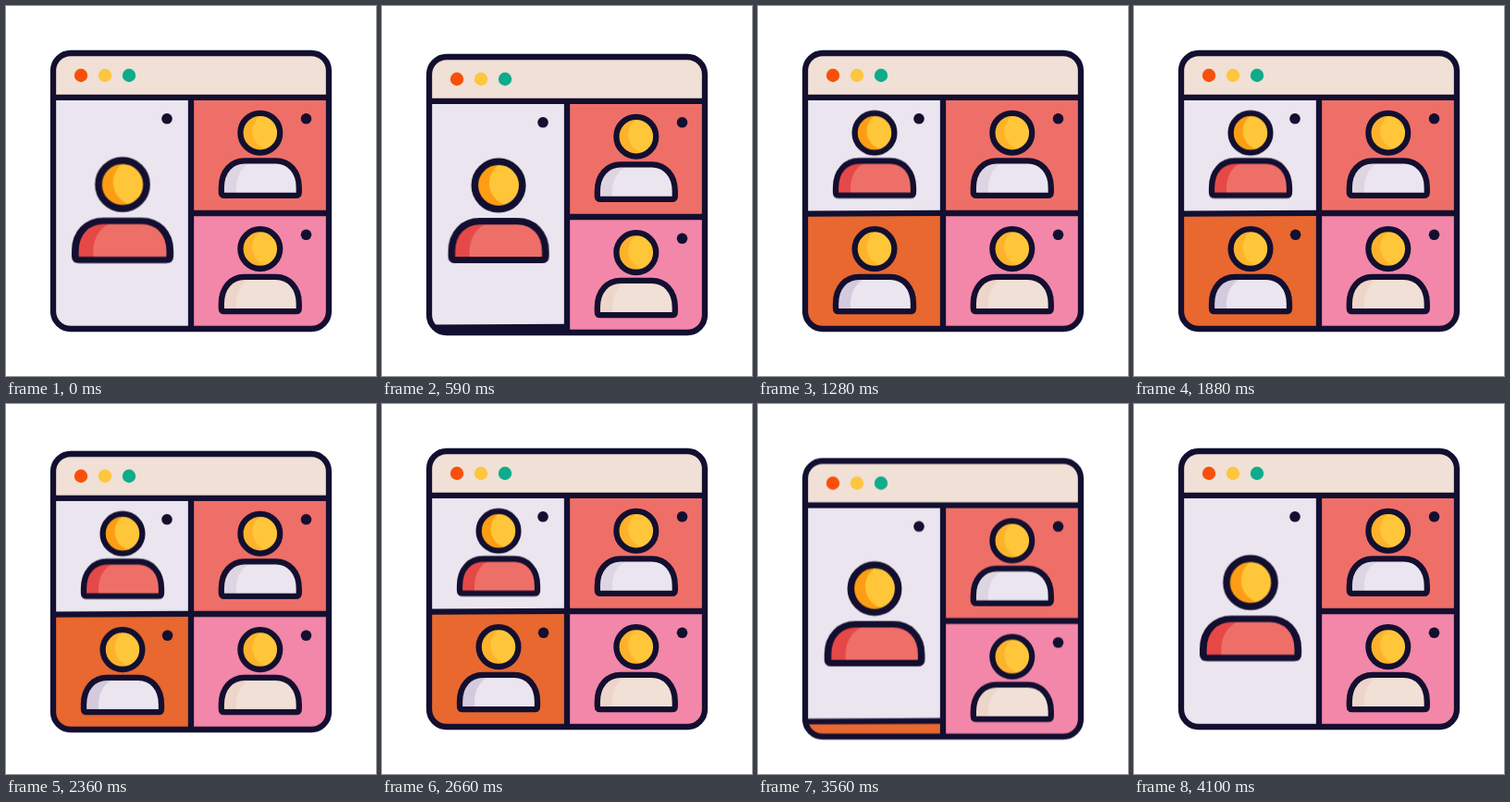
Animation, 400 px wide and 400 px high, one loop 4130 ms. Source, as an HTML page:

```html
<!DOCTYPE html>
<html lang="en">
<head>
<meta charset="utf-8">
<title>Video call</title>
<style>
  html, body { margin: 0; width: 100%; height: 100%; overflow: hidden; background: #fff; }
  svg { display: block; width: 100%; height: 100%; }
  .line { fill: none; stroke: #130f30; stroke-width: 6.3; vector-effect: non-scaling-stroke; }
  .dot { fill: #130f30; }
  .skin { fill: #fec638; }
  .cheek { fill: var(--cheek); }
  .shirt { fill: var(--shirt); }
  .fold { fill: var(--fold); }

  .window, .pane, .guest, .speaker-head, .speaker-body, .blink {
    animation: 4130ms cubic-bezier(.37, 0, .63, 1) infinite;
  }
  .window { animation-name: bounce; }
  .pane { animation-name: pane; }
  .guest { animation-name: guest; }
  .speaker-head { animation-name: head; }
  .speaker-body { animation-name: body; }
  .blink { animation-name: blink; }

  @keyframes bounce {
    0%, 12.35%, 28.77%, 52.06%, 62.95%, 77.12%, 94.14%, 100% { transform: translateY(0); }
    17.6%, 82.98% { transform: translateY(13px); }
    56.5% { transform: translateY(3px); }
  }
  @keyframes pane {
    0%, 12.83%, 88.62%, 100% { transform: translateY(126px); }
    22.52%, 78.93% { transform: translateY(0); }
  }
  /* The guest travels a little further than the pane holding it. */
  @keyframes guest {
    0%, 12.83%, 88.62%, 100% { transform: translateY(42px); }
    22.52%, 78.93% { transform: translateY(0); }
  }
  @keyframes head {
    0%, 12.83%, 87.9%, 100% { transform: translate(126px, 193px) scale(1.215); }
    22.52%, 78.21% { transform: translate(126px, 137.2px) scale(1); }
  }
  @keyframes body {
    0%, 12.83%, 87.9%, 100% { transform: translate(126px, 232.2px) scale(1.22, 1.13); }
    22.52%, 78.21% { transform: translate(126px, 167.4px) scale(1); }
  }
  @keyframes blink {
    0%, 27%, 38%, 100% { opacity: 1; }
    29.5%, 35% { opacity: 0; }
  }
</style>
</head>
<body>
<svg viewBox="0 0 400 400">
  <defs>
    <clipPath id="frame-clip"><rect x="51" y="51" width="298" height="298" rx="19"/></clipPath>

    <circle id="face" r="21.4"/>
    <clipPath id="face-clip"><use href="#face"/></clipPath>
    <g id="head">
      <use href="#face" class="cheek"/>
      <circle cx="12" cy="-2" r="20.5" class="skin" clip-path="url(#face-clip)"/>
      <use href="#face" class="line"/>
    </g>

    <path id="torso" d="M-42 34V29C-42 11-31 0-17 0H17C31 0 42 11 42 29V34Q42 37.4 38.6 37.4H-38.6Q-42 37.4-42 34Z"/>
    <clipPath id="torso-clip"><use href="#torso"/></clipPath>
    <g id="body">
      <use href="#torso" class="shirt"/>
      <path d="M-45 40V-5H-4V0C-18 3-26 14-26 30V40Z" class="fold" clip-path="url(#torso-clip)"/>
      <use href="#torso" class="line"/>
    </g>

    <g id="person">
      <use href="#head" y="137.2"/>
      <use href="#body" y="167.4"/>
    </g>
  </defs>

  <g class="window">
    <g clip-path="url(#frame-clip)">
      <rect x="51" y="51" width="298" height="48" fill="#f0e0d6"/>
      <rect x="51" y="99" width="149" height="250" fill="#eae5ee"/>
      <rect x="200" y="99" width="149" height="125" fill="#ee6f68"/>
      <rect x="200" y="224" width="149" height="125" fill="#f287a9"/>

      <g class="pane">
        <rect x="51" y="224" width="149" height="126" fill="#e8682f"/>
        <g class="guest" style="--cheek:#fcb32b;--shirt:#eae5ee;--fold:#d5cadd">
          <use href="#person" x="126" y="125.4"/>
          <circle class="dot blink" cx="174.6" cy="247.3" r="5.8"/>
        </g>
        <path class="line" d="M51 224.6L200 223.8"/>
      </g>

      <g style="--cheek:#fd9d14;--shirt:#ee6f68;--fold:#e54947">
        <g class="speaker-head"><use href="#head"/></g>
        <g class="speaker-body"><use href="#body"/></g>
      </g>
      <use href="#person" x="274.8" style="--cheek:#fcb32b;--shirt:#eae5ee;--fold:#ddd5e2"/>
      <use href="#person" x="274.8" y="125.4" style="--cheek:#fcb32b;--shirt:#f0e0d6;--fold:#eed5c9"/>
      <circle class="dot" cx="174" cy="121.8" r="5.8"/>
      <circle class="dot" cx="324.5" cy="121.8" r="5.8"/>
      <circle class="dot" cx="324.5" cy="247.3" r="5.8"/>
    </g>

    <circle cx="81" cy="75" r="7.2" fill="#f8500a"/>
    <circle cx="107" cy="75" r="7.2" fill="#fec53e"/>
    <circle cx="133" cy="75" r="7.2" fill="#0eab8c"/>
    <path class="line" d="M51 98.8H349M200 98.8V349M200 224H349"/>
    <rect class="line" x="51" y="51" width="298" height="298" rx="19"/>
  </g>
</svg>
</body>
</html>
```
